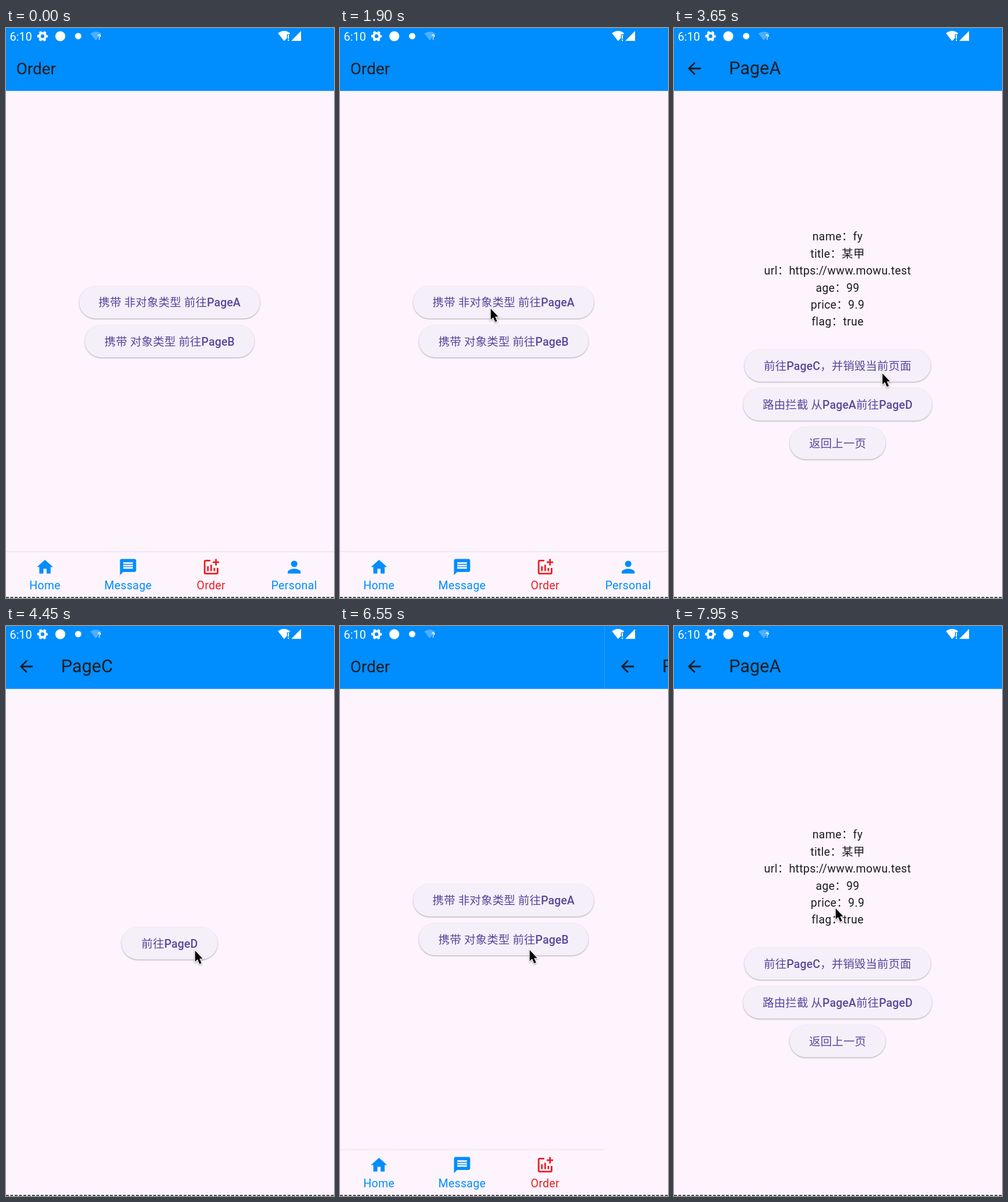
Write an HTML page that moves like this. It is 568 by 985 pixels and loops after 8 s.

```html
<!DOCTYPE html>
<html lang="zh-CN">
<head>
<meta charset="utf-8">
<title>Page navigation</title>
<style>
  html, body { margin: 0; height: 100%; overflow: hidden; background: #fef4fe; }
  svg { display: block; width: 100vw; height: 100vh; }
  text { font: 19.6px Roboto, "Noto Sans CJK SC", "Noto Sans CJK JP", sans-serif; fill: #1d1b20; }
  .body, .label { letter-spacing: .35px; }
  .body, .label, .caption { text-anchor: middle; }
  .caption { fill: #59479b; letter-spacing: .14px; }
  .caption tspan { font-weight: 500; }
  .button { fill: #f5eff9; filter: drop-shadow(0 1.4px 1px #0005); }
  .pointer { stroke: #fff; stroke-width: 2.4; paint-order: stroke; filter: drop-shadow(0 1.5px 1px #0006); }
</style>
</head>
<body>
<svg viewBox="0 0 568 985" preserveAspectRatio="none">
  <g id="pages"></g>

  <g id="status" fill="#fff">
    <text x="6.5" y="22" style="font-size:20px;fill:#fff">6:10</text>
    <g fill="none" stroke="#fff">
      <circle cx="63.3" cy="14.2" r="5.2" stroke-width="4"/>
      <circle cx="63.3" cy="14.2" r="7.8" stroke-width="2.8" stroke-dasharray="4.2 3.968" stroke-dashoffset="2.1"/>
    </g>
    <circle cx="94" cy="14.2" r="8.6"/>
    <circle cx="125" cy="14" r="5.5"/>
    <path d="M146 9.500Q155.500 3 165 9.500L155.500 21.500Z" opacity=".3"/>
    <text x="158.500" y="20" style="font-size:12.500px;font-weight:700;fill:#fff">?</text>
    <path d="M471 9Q481.500 1 492 9L490.500 11H486.500V17.500L481.500 22.500Z"/>
    <path d="M488 12H490V18.500H488ZM488 20H490V22.300H488ZM494 22.300L511 5V22.300Z"/>
  </g>

  <rect y="983" width="568" height="2" fill="#fff"/>
  <path d="M0 984H568" stroke="#111" stroke-width="1.6" stroke-dasharray="5 2.5"/>
  <path id="pointer" class="pointer" d="M1 2V21L5.200 17L8.700 25L12 23.600L8.600 15.700H14Z"/>
</svg>

<script>
const LOOP = 8000, SLIDE = 300;
const LEFT = -4.4, WIDTH = 575.4, CENTER = LEFT + WIDTH / 2;
const BLUE = '#008dfd', RED = '#ec1c20', BACKGROUND = '#fef4fe';

const ICONS = {
  back: 'M20 11H7.83l5.59-5.59L12 4l-8 8 8 8 1.41-1.41L7.83 13H20z',
  home: 'M10 20v-6h4v6h5v-8h3L12 3 2 12h3v8z',
  message: 'M20 2H4c-1.1 0-2 .9-2 2v18l4-4h14c1.1 0 2-.9 2-2V4c0-1.1-.9-2-2-2zM6 9h12v2H6zm12 5H6v-2h12zm0-6H6V6h12z',
  order: 'M22 5v2h-3v3h-2V7h-3V5h3V2h2v3zm-3 14H5V5h6V3H5c-1.1 0-2 .9-2 2v14c0 1.1.9 2 2 2h14c1.1 0 2-.9 2-2v-6h-2zm-4-6v4h2v-4zm-4 4h2V9h-2zm-2 0v-6H7v6z',
  personal: 'M12 12a4 4 0 1 0 0-8 4 4 0 0 0 0 8zm0 2c-2.67 0-8 1.34-8 4v2h16v-2c0-2.66-5.33-4-8-4z'
};

const icon = (name, x, y, color) =>
  `<path d="${ICONS[name]}" fill="${color}" transform="translate(${x - 16.8} ${y - 16.8}) scale(1.4)"/>`;

const button = (y, width, caption) => `
  <rect class="button" x="${CENTER - width / 2}" y="${y - 28}" width="${width}" height="56" rx="28"/>
  <text class="caption" x="${CENTER}" y="${y + 7.3}">${caption.replace(/\w+/g, '<tspan>$&</tspan>')}</text>`;

const page = (id, title, content) => `<g id="${id}">
  <rect x="${LEFT}" width="${WIDTH}" height="985" fill="${BACKGROUND}"/>
  <rect x="${LEFT}" width="${WIDTH}" height="108.7" fill="${BLUE}"/>
  ${title}${content}</g>`;

const subPage = (id, content) => page(id,
  icon('back', 35.2, 70, '#1d1b20') + `<text x="95.3" y="80" style="font-size:30.8px">${id}</text>`, content);

const tab = (name, i) => {
  const x = LEFT + WIDTH * (i + .5) / 4, color = name === 'Order' ? RED : BLUE;
  return icon(name.toLowerCase(), x, 931.6, color) +
    `<text class="label" x="${x}" y="970" style="fill:${color}">${name}</text>`;
};

const details = ['name：fy', 'title：某甲', 'url：https://www.mowu.test', 'age：99', 'price：9.9', 'flag：true']
  .map((line, i) => `<text class="body" x="${CENTER}" y="${367.3 + 29.4 * i}">${line}</text>`).join('');

document.getElementById('pages').innerHTML =
  page('Order', '<text x="17.8" y="80.3" style="font-size:28px">Order</text>',
    button(474, 313, '携带 非对象类型 前往PageA') +
    button(541.2, 293.5, '携带 对象类型 前往PageB') +
    `<path d="M${LEFT} 905h${WIDTH}" stroke="#eee5ef" stroke-width="1.4"/>` +
    ['Home', 'Message', 'Order', 'Personal'].map(tab).join('')) +
  subPage('PageA', details +
    button(583.2, 322.5, '前往PageC，并销毁当前页面') +
    button(650.4, 327, '路由拦截 从PageA前往PageD') +
    button(717.3, 166, '返回上一页')) +
  subPage('PageC', button(548.2, 166, '前往PageD')) +
  subPage('PageD', button(548.2, 304.5, '前往首页，并销毁所有页面'));

// Each visit: when the page slides in, when it leaves, and whether it slides out.
const VISITS = {
  PageA: [[2100, 6282, false], [7380, LOOP, false]],
  PageC: [[3700, 6282, false]],
  PageD: [[4980, 6282, true]]
};

// Pointer stops: time, x, y
const STOPS = [
  [1100, 300, 990], [1700, 260, 483], [2700, 260, 483], [3350, 360, 595],
  [4300, 360, 595], [4450, 326.5, 559], [4650, 327.5, 558], [6650, 327.5, 558],
  [7100, 279, 486], [LOOP, 279, 486]
];

const clamp = v => Math.max(0, Math.min(1, v));

function pageOffset(visits, t) {
  for (const [enter, leave, slidesOut] of visits) {
    if (t < enter || t >= leave + (slidesOut ? SLIDE : 0)) continue;
    if (t >= leave) return WIDTH * ((t - leave) / SLIDE) ** 2;
    return WIDTH * (1 - clamp((t - enter) / SLIDE)) ** 2;
  }
  return null;
}

function pointerAt(t) {
  const next = STOPS.findIndex(stop => stop[0] > t);
  if (next < 1) return null;
  const [t0, x0, y0] = STOPS[next - 1], [t1, x1, y1] = STOPS[next];
  const p = (t - t0) / (t1 - t0), k = p * p * (3 - 2 * p);
  return [x0 + (x1 - x0) * k, y0 + (y1 - y0) * k];
}

function place(id, x, y, visible) {
  const node = document.getElementById(id);
  node.setAttribute('visibility', visible ? 'visible' : 'hidden');
  node.setAttribute('transform', `translate(${x} ${y})`);
}

function render(now) {
  const t = now % LOOP;
  for (const id in VISITS) {
    const x = pageOffset(VISITS[id], t);
    place(id, x ?? 0, 0, x !== null);
  }
  const spot = pointerAt(t);
  place('pointer', spot ? spot[0] : 0, spot ? spot[1] : 0, spot);
}

const start = performance.now();
function tick() {
  render(performance.now() - start);
  requestAnimationFrame(tick);
}
tick();
</script>
</body>
</html>
```
